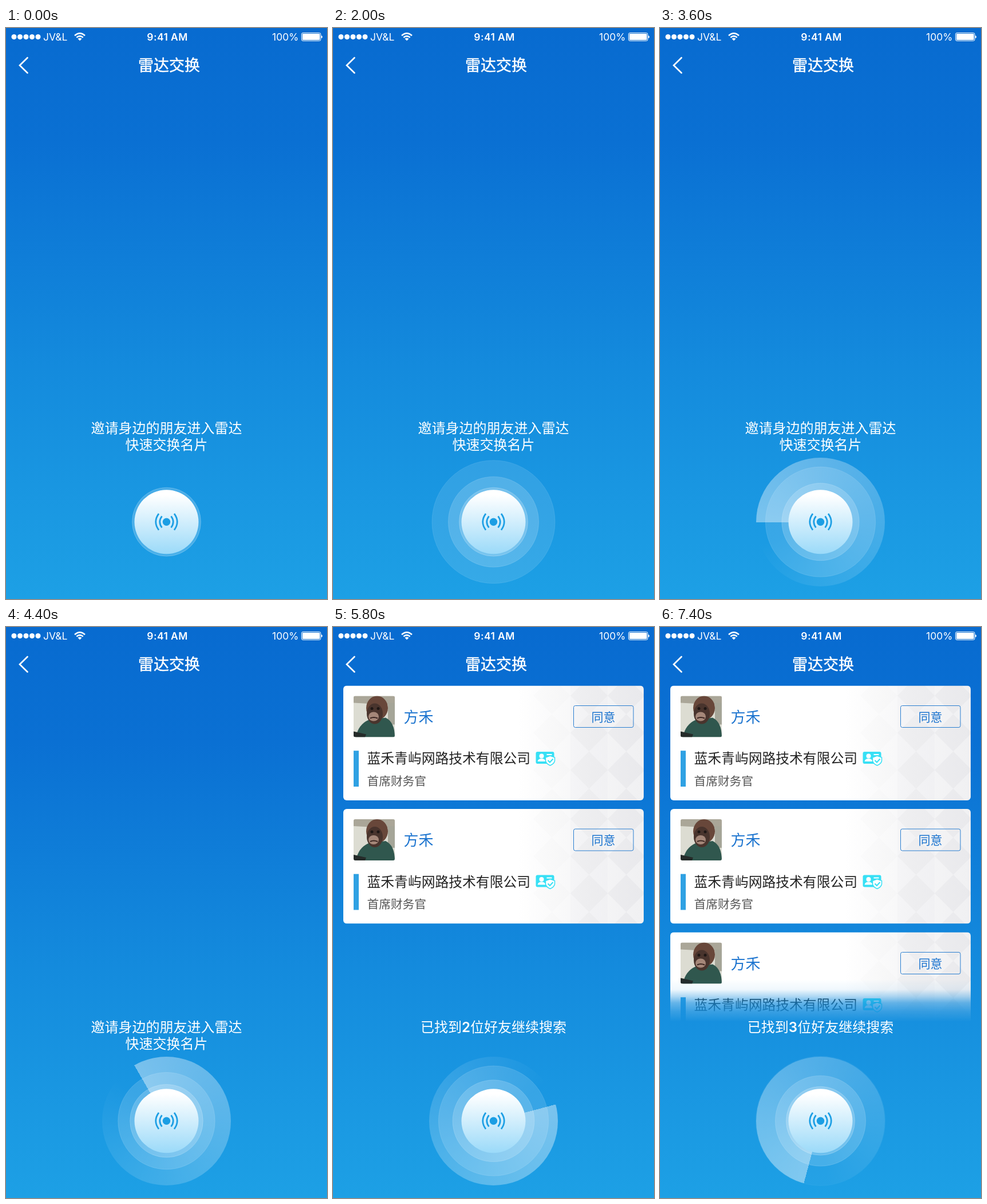
Write an HTML page that moves like this. It is 561 px wide and 998 px high and loops after 7.6 s.

```html
<!DOCTYPE html>
<html lang="zh-CN">
<head>
<meta charset="utf-8">
<title>雷达交换</title>
<style>
  html, body { margin: 0; width: 100%; height: 100%; overflow: hidden; }
  body { position: relative; background: #148bdd; }
  svg { position: absolute; left: 0; top: 0; width: 561px; height: 998px; }
  text { font-family: Inter, "Noto Sans CJK SC", "Noto Sans CJK", sans-serif; }
  .mid { text-anchor: middle; }
  .light { font-weight: 300; }
  #sweep { position: absolute; left: 168px; top: 750.7px; width: 225px; height: 225px; border-radius: 50%; }
</style>
</head>
<body>
<svg viewBox="0 0 561 998">
  <defs>
    <linearGradient id="sky" x2="0" y2="1">
      <stop stop-color="#086bd0"/>
      <stop offset=".2" stop-color="#0a70d3"/>
      <stop offset=".6" stop-color="#148bdd"/>
      <stop offset=".8" stop-color="#1996e1"/>
      <stop offset="1" stop-color="#1da0e5"/>
    </linearGradient>
    <linearGradient id="paper">
      <stop offset=".58" stop-color="#fff"/>
      <stop offset=".8" stop-color="#f6f6f7"/>
      <stop offset="1" stop-color="#f0f0f2"/>
    </linearGradient>
    <linearGradient id="fade" gradientUnits="userSpaceOnUse" x1="0" y1="616" x2="0" y2="690">
      <stop stop-color="#fff"/>
      <stop offset=".24" stop-color="#eee"/>
      <stop offset=".4" stop-color="#a8a8a8"/>
      <stop offset=".55" stop-color="#585858"/>
      <stop offset=".75" stop-color="#282828"/>
      <stop offset="1" stop-color="#000"/>
    </linearGradient>
    <mask id="listMask" maskUnits="userSpaceOnUse" x="0" y="0" width="561" height="998">
      <rect width="561" height="998" fill="url(#fade)"/>
    </mask>
    <clipPath id="cardClip"><rect width="525" height="200.5" rx="6"/></clipPath>
    <clipPath id="photoClip"><rect width="72" height="72" rx="3"/></clipPath>

    <g id="photo" clip-path="url(#photoClip)">
      <rect width="72" height="72" fill="#dcdcd2"/>
      <path d="M0 0H72V16L0 12Z" fill="#aaa698"/>
      <path d="M60 12H72V50H60Z" fill="#a5a598"/>
      <ellipse cx="41" cy="21" rx="19" ry="21" fill="#68473a"/>
      <path d="M4 72Q8 50 26 42L56 38Q72 46 72 72Z" fill="#30574e"/>
      <path d="M0 62L22 67L20 72H0Z" fill="#252b29"/>
      <ellipse cx="37" cy="31" rx="14" ry="18" fill="#49342d"/>
      <ellipse cx="35" cy="36" rx="9" ry="8" fill="#a58779"/>
      <circle cx="32" cy="22" r="2.5" fill="#1f1715"/>
      <circle cx="43" cy="22" r="2.5" fill="#1f1715"/>
      <path d="M29 39Q35 36 42 39" fill="none" stroke="#3a2521" stroke-width="2"/>
    </g>

    <g id="badge">
      <rect width="32" height="21" rx="3" fill="#38e0f5"/>
      <g fill="#fff">
        <circle cx="10" cy="7.5" r="4"/>
        <path d="M3 17Q4 12 10 12T17 17Z"/>
        <path d="M19 4H28V6H19Z"/>
      </g>
      <path d="M17 10L25 7L33 10V16Q32 21 25 24Q18 21 17 16Z" fill="#fff" stroke="#38e0f5" stroke-width="1.5"/>
      <path d="M21 15L24.5 18.5L30 12.5" fill="none" stroke="#38e0f5" stroke-width="2"/>
    </g>

    <g id="card">
      <g clip-path="url(#cardClip)">
        <rect width="525" height="200.5" fill="url(#paper)"/>
        <g id="facets" fill="#62626f"></g>
      </g>
      <use href="#photo" x="18" y="18"/>
      <text x="105.500" y="64" font-size="26" fill="#1c74cf">方禾</text>
      <rect x="402.500" y="35" width="104.500" height="38" rx="3" fill="none" stroke="#2b7fd0"/>
      <text class="mid" x="454.500" y="62" font-size="21" fill="#1c74cf">同意</text>
      <rect x="18" y="113.700" width="9" height="62.800" fill="#2fa1e3"/>
      <text x="41.500" y="135.500" font-size="23.800" fill="#222">蓝禾青屿网路技术有限公司</text>
      <use href="#badge" x="336.500" y="115.500"/>
      <text x="41.500" y="174" font-size="20.700" fill="#555">首席财务官</text>
    </g>
  </defs>

  <rect width="561" height="998" fill="url(#sky)"/>

  <g fill="#fff">
    <g id="signal"></g>
    <text x="65" y="22" font-size="17.500">JV&amp;L</text>
    <g fill="none" stroke="#fff" stroke-width="2.500">
      <path d="M120 13.200Q129 5.400 138 13.200M123.300 16.600Q129 11.600 134.700 16.600"/>
    </g>
    <path d="M125.500 18.800Q129 16 132.500 18.800L129 22.300Z"/>
    <text class="mid" x="282" y="21.800" font-size="17.500" font-weight="600" letter-spacing=".4">9:41 AM</text>
    <text x="511.500" y="22" font-size="17.500" text-anchor="end">100%</text>
    <rect x="516.500" y="8.500" width="33.500" height="14" rx="2.500" fill="none" stroke="#fff"/>
    <rect x="518" y="10" width="30.500" height="11" rx="1"/>
    <path d="M551 13Q553 13.500 553 15.500T551 18Z"/>
    <path d="M37.500 52L24 65.300L37.500 78.500" fill="none" stroke="#fff" stroke-width="2.700" stroke-linecap="round"/>
    <text class="mid" x="285" y="75.300" font-size="27" font-weight="500" stroke="#fff" stroke-width=".5">雷达交换</text>
  </g>

  <g id="list" mask="url(#listMask)"></g>

  <g fill="#fff" font-size="24" class="mid light">
    <g id="invite">
      <text x="280.500" y="708">邀请身边的朋友进入雷达</text>
      <text x="280.500" y="736.500">快速交换名片</text>
    </g>
    <text id="found" x="280.500" y="708">已找到<tspan id="count" font-weight="600"></tspan>位好友继续搜索</text>
  </g>

  <g id="rings" fill="#fff" stroke="#fff"></g>
</svg>

<div id="sweep"></div>

<svg viewBox="0 0 561 998">
  <linearGradient id="pearl" x2="0" y2="1">
    <stop offset=".08" stop-color="#fff"/>
    <stop offset="1" stop-color="#9bdaf9"/>
  </linearGradient>
  <g transform="translate(280.500 863.200)">
    <circle r="56" fill="url(#pearl)"/>
    <circle r="6.700" fill="#1b9ee4"/>
    <g fill="none" stroke="#1b9ee4" stroke-width="2.700">
      <path d="M8 -10Q15.500 0 8 10M-8 -10Q-15.500 0 -8 10"/>
      <path d="M13.500 -14.300Q24 0 13.500 14.300M-13.500 -14.300Q-24 0 -13.500 14.300"/>
    </g>
  </g>
</svg>

<script>
const LOOP = 7600, STEP = 200;
const RING_STARTS = [0, 1000, 2000, 3200, 4200, 5200, 6400, 7400];
const CARD_STARTS = [4600, 5600, 6600];
const SWEEP_START = 2400;

const byId = id => document.getElementById(id);

function add(parent, tag, attributes) {
  const node = document.createElementNS('http://www.w3.org/2000/svg', tag);
  for (const key in attributes) node.setAttribute(key, attributes[key]);
  return parent.appendChild(node);
}

for (let i = 0; i < 5; i++) add(byId('signal'), 'circle', { cx: 14 + i * 10.5, cy: 15.5, r: 4.5 });

// Faint diamonds, stronger towards the right edge of the card.
for (let col = 0; col < 3; col++) {
  for (let row = 0; row < 4; row++) {
    add(byId('facets'), 'path', {
      d: `M${364.5 + col * 65} ${row * 65 - 15}l32.5 32.5l-32.5 32.5l-32.5 -32.5z`,
      opacity: 0.01 + 0.02 * col
    });
  }
}
add(byId('facets'), 'rect', { x: 397, width: 65, height: 201, opacity: 0.015 });

const cards = CARD_STARTS.map((start, i) =>
  add(byId('list'), 'use', { href: '#card', x: 18, y: 102.5 + i * 215.5 }));
const rings = RING_STARTS.map(() =>
  add(byId('rings'), 'circle', { cx: 280.5, cy: 863.2 }));

const show = (node, visible) => { node.style.display = visible ? '' : 'none'; };

function drawRing(ring, age) {
  const visible = age >= 0 && age < 2.3;
  show(ring, visible);
  if (!visible) return;
  const alpha = age <= 2 ? 0.2 - 0.045 * age : 0.11 * (2.3 - age) / 0.3;
  ring.setAttribute('r', 60 + 19 * Math.min(age, 1) + 28.5 * Math.max(age - 1, 0));
  ring.setAttribute('fill-opacity', alpha);
  ring.setAttribute('stroke-opacity', alpha);
}

function render(time) {
  const t = Math.floor((time % LOOP) / STEP) * STEP;
  rings.forEach((ring, i) => drawRing(ring, (t - RING_STARTS[i]) / 1000));

  // CSS angles start at twelve o'clock, so six o'clock is 180deg.
  const angle = 180 + (t - SWEEP_START) * 0.075;
  const sweep = byId('sweep');
  show(sweep, t >= SWEEP_START);
  sweep.style.background =
    `conic-gradient(from ${angle}deg, rgba(255,255,255,.42), rgba(255,255,255,0) 340deg)`;

  const count = CARD_STARTS.filter(start => t >= start).length;
  cards.forEach((card, i) => show(card, i < count));
  show(byId('invite'), count === 0);
  show(byId('found'), count > 0);
  byId('count').textContent = count;
}

const origin = performance.now();
function tick() {
  render(performance.now() - origin);
  requestAnimationFrame(tick);
}
tick();
</script>
</body>
</html>
```
